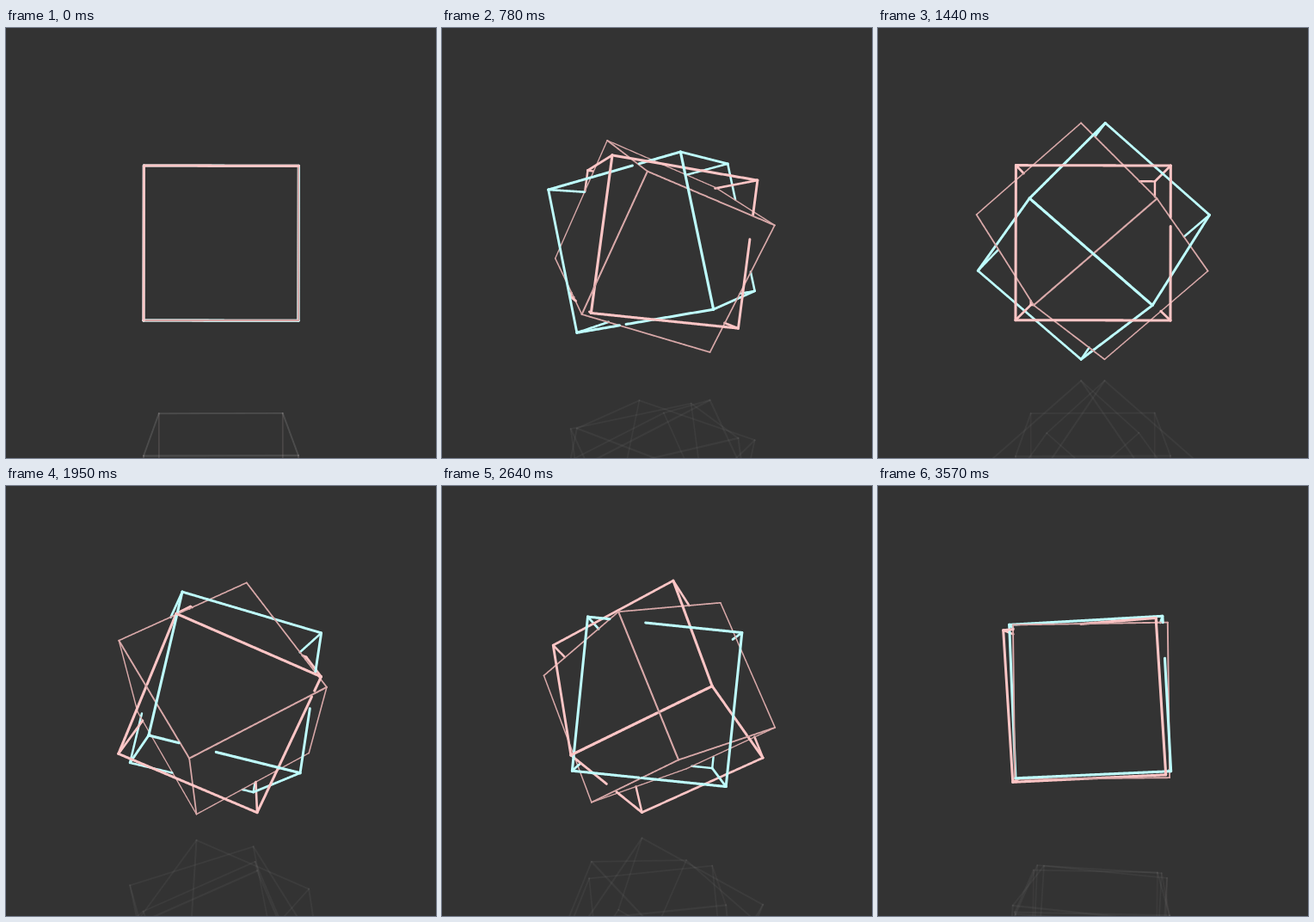
An HTML page with a canvas for the animation above (3.6 s loop, 500x500 px).

```html
<!DOCTYPE html>
<html lang="en">
<head>
<meta charset="utf-8">
<title>Turning cubes</title>
<style>
  html, body { margin: 0; height: 100%; overflow: hidden; background: #333; }
  canvas { display: block; }
</style>
</head>
<body>
<canvas id="stage" width="500" height="500"></canvas>
<script>
const ctx = document.getElementById('stage').getContext('2d');
const LOOP = 3600, MID = 250, HALF = 80, EYE = 720, FLOOR = 150, STEPS = 120;

// The first cube is solid and hides what lies behind it; the others are wire frames.
const cubes = [
  { turns: 0.25, color: '#d9a9a9', width: s => 1.5 * s * s },
  { turns: 1.25, color: '#ffc6c6', width: s => 2.7 * s },
  { turns: 1, color: '#bfffff', width: s => 2.7 * s },
];

const edges = [];
for (let axis = 0; axis < 3; axis++) {
  for (const a of [-HALF, HALF]) for (const b of [-HALF, HALF]) {
    const ends = [-HALF, HALF].map(v => {
      const p = [0, 0, 0];
      p[axis] = v;
      p[(axis + 1) % 3] = a;
      p[(axis + 2) % 3] = b;
      return p;
    });
    edges.push(ends);
  }
}

const spin = (a, b, angle) => {
  const c = Math.cos(angle), s = Math.sin(angle);
  return [a * c - b * s, a * s + b * c];
};

function rotate([x, y, z], angle) {
  [x, y] = spin(x, y, angle);
  [y, z] = spin(y, z, -angle);
  [z, x] = spin(z, x, angle);
  return [x, y, z];
}

function unrotate([x, y, z], angle) {
  [z, x] = spin(z, x, -angle);
  [y, z] = spin(y, z, angle);
  [x, y] = spin(x, y, -angle);
  return [x, y, z];
}

const scaleAt = z => EYE / (EYE - z);
const project = ([x, y, z]) => [MID + x * scaleAt(z), MID + y * scaleAt(z)];
const mix = (p, q, t) => p.map((v, i) => v + (q[i] - v) * t);
const mirror = ([x, y, z]) => [x, 2 * FLOOR - y, z];

// Does the sight line from p to the eye pass through the solid cube?
function isHidden(p, eye) {
  const r = HALF - 0.25;
  let near = 0, far = 1;
  for (let i = 0; i < 3; i++) {
    const d = (eye[i] - p[i]) || 1e-9;
    const t1 = (-r - p[i]) / d, t2 = (r - p[i]) / d;
    near = Math.max(near, Math.min(t1, t2));
    far = Math.min(far, Math.max(t1, t2));
  }
  return near < far;
}

function strokeEdge({ p, q, scale, cube }, solidAngle, eye) {
  const a = unrotate(p, solidAngle), b = unrotate(q, solidAngle);
  ctx.strokeStyle = cube.color;
  ctx.lineWidth = cube.width(scale);
  ctx.beginPath();
  let drawing = false;
  for (let i = 0; i <= STEPS; i++) {
    const t = i / STEPS;
    const visible = !isHidden(mix(a, b, t), eye);
    if (visible) ctx[drawing ? 'lineTo' : 'moveTo'](...project(mix(p, q, t)));
    drawing = visible;
  }
  ctx.stroke();
}

function strokeReflection({ p, q, scale }) {
  ctx.lineWidth = 2 * scale;
  ctx.beginPath();
  ctx.moveTo(...project(mirror(p)));
  ctx.lineTo(...project(mirror(q)));
  ctx.stroke();
}

function draw(now) {
  const angle = (now % LOOP) / LOOP * 2 * Math.PI;
  const solidAngle = angle * cubes[0].turns;
  const eye = unrotate([0, 0, EYE], solidAngle);
  const lines = cubes.flatMap(cube => edges.map(ends => {
    const [p, q] = ends.map(v => rotate(v, angle * cube.turns));
    return { p, q, cube, scale: scaleAt((p[2] + q[2]) / 2) };
  }));
  lines.sort((a, b) => a.scale - b.scale);

  ctx.fillStyle = '#333';
  ctx.fillRect(0, 0, 500, 500);
  ctx.lineCap = ctx.lineJoin = 'round';
  ctx.strokeStyle = 'rgba(255, 235, 235, 0.045)';
  lines.forEach(strokeReflection);
  lines.forEach(line => strokeEdge(line, solidAngle, eye));
}

const start = performance.now();
function tick() {
  draw(performance.now() - start);
  requestAnimationFrame(tick);
}
tick();
</script>
</body>
</html>
```
